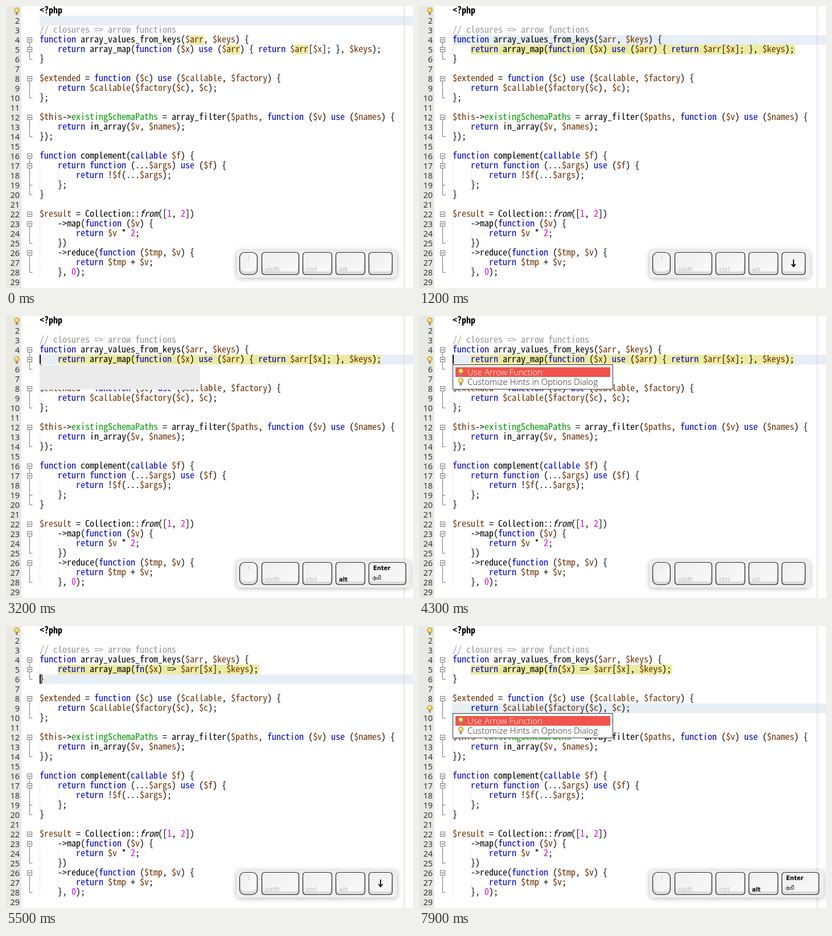
These frames come from a looping animation (715 by 495 pixels, 8 s). An HTML page:

```html
<!DOCTYPE html>
<html lang="en">
<head>
<meta charset="utf-8">
<style>
html, body { margin: 0; width: 100%; height: 100%; overflow: hidden; background: #fff; }
svg { display: block; width: 715px; height: 495px; }
text { white-space: pre; }
.code { font: 16px "Noto Sans Mono CJK JP", "Noto Sans CJK JP", monospace; }
.num { font: 14.5px "Noto Sans", sans-serif; text-anchor: end; }
.menu { font: 300 15px "Open Sans", sans-serif; }
.key { font: bold 10px "DejaVu Sans", sans-serif; }
.tag { font-weight: bold; }
.from { font-style: italic; }
.com { fill: #969696; }
.kw { fill: #0000c8; }
.var { fill: #6d3206; }
.field { fill: #009900; }
.lit { fill: #e100e1; }
</style>
</head>
<body>
<svg id="stage" viewBox="0 0 715 495"></svg>
<script>
const LOOP = 8000, ROW = 17, COL = 8, LEFT = 59;
const stage = document.getElementById('stage');
const lines = `<?php

// closures => arrow functions
function array_values_from_keys($arr, $keys) {
    return array_map(function ($x) use ($arr) { return $arr[$x]; }, $keys);
}

$extended = function ($c) use ($callable, $factory) {
    return $callable($factory($c), $c);
};

$this->existingSchemaPaths = array_filter($paths, function ($v) use ($names) {
    return in_array($v, $names);
});

function complement(callable $f) {
    return function (...$args) use ($f) {
        return !$f(...$args);
    };
}

$result = Collection::from([1, 2])
    ->map(function ($v) {
        return $v * 2;
    })
    ->reduce(function ($tmp, $v) {
        return $tmp + $v;
    }, 0);
`.split('\n');
const shortLine = '    return array_map(fn($x) => $arr[$x], $keys);';

// [time, changes]; each entry stays in force until overridden
const steps = [
  [0, { row: 2, caret: 0, marks: 1, hint: 0, bulb: 0, menu: 0, short: 0, keys: '' }],
  [200, { caret: 1 }],
  [400, { row: 3, caret: 0, keys: 'down' }],
  [500, { caret: 1, marks: 0, hint: 1 }],
  [800, { caret: 0, keys: '' }],
  [1100, { caret: 1 }],
  [1200, { row: 4, caret: 0, keys: 'down' }],
  [1300, { caret: 1 }],
  [1600, { caret: 0, keys: '' }],
  [1900, { caret: 1 }],
  [2000, { row: 5, caret: 0, keys: 'down' }],
  [2100, { caret: 1 }],
  [2400, { caret: 0, keys: '' }],
  [2600, { caret: 1, bulb: 5 }],
  [3200, { menu: 1, keys: 'alt enter' }],
  [3300, { menu: 2 }],
  [3600, { keys: 'alt' }],
  [3800, { keys: '' }],
  [4000, { caret: 0 }],
  [4300, { caret: 1 }],
  [4600, { caret: 0 }],
  [4800, { menu: 0, bulb: 0, short: 1, keys: 'enter' }],
  [4900, { caret: 1 }],
  [5200, { caret: 0 }],
  [5500, { row: 6, caret: 1, keys: 'down' }],
  [5700, { row: 7 }],
  [5800, { row: 8 }],
  [5900, { row: 9 }],
  [6100, { caret: 0 }],
  [6400, { caret: 1, keys: '' }],
  [6600, { bulb: 9 }],
  [6700, { caret: 0 }],
  [7000, { caret: 1 }],
  [7300, { caret: 0 }],
  [7500, { menu: 1, keys: 'alt enter' }],
  [7600, { menu: 2, caret: 1 }],
  [7900, { caret: 0 }]
];

const rowY = n => (n - 1) * ROW;
const esc = s => s.replace(/&/g, '&amp;').replace(/</g, '&lt;').replace(/>/g, '&gt;');
const rect = (x, y, w, h, fill, more = '') =>
  `<rect x="${x}" y="${y}" width="${w}" height="${h}" fill="${fill}" ${more}/>`;
const path = (d, stroke, more = '') => `<path d="${d}" fill="none" stroke="${stroke}" ${more}/>`;
const text = (x, y, cls, s, fill = '#000') => `<text x="${x}" y="${y}" class="${cls}" fill="${fill}">${s}</text>`;

const token = /(\/\/.*)|(<\?php)|(\$\w+)|\b(function|return|use|callable|fn)\b|(existingSchemaPaths)|\b(from)\b|\b(\d+)\b/g;
const kinds = ['com', 'tag', 'var', 'kw', 'field', 'from', 'lit'];

function codeLine(src, n) {
  const body = src.trimStart();
  let out = '', at = 0;
  for (const m of body.matchAll(token)) {
    const kind = kinds[m.slice(1).findIndex(Boolean)];
    out += esc(body.slice(at, m.index)) + `<tspan class="${kind}">${esc(m[0])}</tspan>`;
    at = m.index + m[0].length;
  }
  out += esc(body.slice(at));
  return text(LEFT + (src.length - body.length) * COL, rowY(n) + 13, 'code', out);
}

function guides() {
  let out = '';
  lines.forEach((s, i) => {
    for (let c = 0; c < s.search(/\S/); c += 4)
      out += path(`M${LEFT + c * COL + .5} ${i * ROW}v${ROW}`, '#ccc', 'stroke-dasharray="1 2"');
  });
  return out;
}

function folds() {
  let out = '';
  for (const [a, b] of [[4, 6], [8, 10], [12, 14], [16, 20], [23, 25], [26, 28]])
    out += path(`M41.5 ${rowY(a) + 13}V${rowY(b) + 8.5}h5`, '#777');
  out += path(`M41.5 ${rowY(19) + 8.5}h5`, '#777');
  for (const n of [4, 5, 8, 12, 16, 17, 22, 23, 26]) {
    const y = rowY(n) + 4.5;
    out += rect(37.5, y, 8, 8, '#fff', 'stroke="#777"') + path(`M39 ${y + 4}h5`, '#444');
  }
  return out;
}

const bulb = (x, y) => `<g transform="translate(${x} ${y})">` +
  '<circle r="4.3" cy="-1.5" fill="#f3cf55" stroke="#a98222"/><circle r="1.7" cx="-1" cy="-2.5" fill="#fff6c8"/>' +
  rect(-2, 2.5, 4, 4, '#77736b') + path('M-2 4.5h4', '#ccc') + '</g>';

function menu(s) {
  const y = rowY(s.row) + ROW;
  if (s.menu == 1) return rect(LEFT, y + 1, 282, 43, '#ebebeb');
  return rect(LEFT + .5, y + .5, 281, 43, '#fff', 'stroke="#333"') +
    rect(64, y + 5, 272, 17, '#f0544c') +
    bulb(73.5, y + 13) + text(85, y + 19, 'menu', 'Use Arrow Function', '#fff') +
    bulb(73.5, y + 30) + text(85, y + 36, 'menu', 'Customize Hints in Options Dialog', '#222');
}

function keyboard(keys) {
  const cap = (x, w, r = 5) => rect(x + .5, 432.5, w - 1, 39, 'url(#cap)', `rx="${r}" stroke="#222" stroke-width="1.2"`) +
    rect(x + 3, 434, w - 6, 32, 'url(#face)', `rx="${r - 1}"`);
  const ink = k => keys.includes(k) ? '#000' : '#d0d0d0';
  const last = keys.includes('enter') ? 66 : 42;
  let out = rect(405, 429, 240 + last, 48, '#efefef', 'rx="6" filter="url(#soft)"') +
    cap(410, 32, 9) + cap(449, 66) + cap(521, 52) + cap(579, 52) + cap(637, last) +
    path('M426.5 438v8', '#ddd', 'stroke-width="2"') +
    text(455, 466, 'key', 'shift', ink('shift')) + text(527, 466, 'key', 'ctrl', ink('ctrl')) +
    text(585, 466, 'key', 'alt', ink('alt'));
  if (keys.includes('enter'))
    out += text(645, 446, 'key', 'Enter') +
      path('M648 457l-4 3.5l4 3.5zM648 459.5h7v-4h3v6.5h-10', '#222');
  if (keys.includes('down'))
    out += path('M658 445v12M654.5 453l3.5 4.5l3.5-4.5', '#000', 'stroke-width="1.8"');
  return out;
}

const defs = `<defs>
<linearGradient id="cap" x2="0" y2="1"><stop stop-color="#fff"/><stop offset="1" stop-color="#d8d8d8"/></linearGradient>
<linearGradient id="face" x2="1" y2="1"><stop stop-color="#eee"/><stop offset="1" stop-color="#fafafa"/></linearGradient>
<filter id="soft" x="-10%" y="-40%" width="120%" height="180%"><feDropShadow dx="0" dy="1" stdDeviation="4" flood-opacity=".3"/></filter>
</defs>`;

function draw(s) {
  const line5 = s.short ? shortLine : lines[4];
  let out = defs + rect(0, 0, 715, 495, '#fff') + rect(0, 0, 27, 495, '#e9e9e3') +
    rect(LEFT, rowY(s.row), 656, ROW, '#e6eef6');
  if (s.marks)
    for (const [n, col] of [[4, 33], [5, 41], [5, 56]])
      out += rect(LEFT + col * COL, rowY(n), 3 * COL, ROW, '#eceba3');
  if (s.hint)
    out += rect(91, rowY(5), (line5.length - 4) * COL + (s.row == 5 ? 0 : 2), ROW, '#eceba3');
  out += path('M699.5 0V495', '#f3caca') + guides() + folds();
  lines.forEach((src, i) => {
    const n = i + 1;
    out += n == 1 || n == s.bulb ? bulb(19, rowY(n) + 9) : text(24, rowY(n) + 14, 'num', n, '#333');
    out += codeLine(n == 5 ? line5 : src, n);
  });
  if (s.caret) out += rect(LEFT, rowY(s.row), 2, ROW - 1, '#000');
  if (s.menu) out += menu(s);
  stage.innerHTML = out + keyboard(s.keys);
}

let shown = -1;
function tick() {
  const t = performance.now() % LOOP;
  const past = steps.filter(([at]) => at <= t);
  if (past.length != shown) {
    shown = past.length;
    draw(Object.assign({}, ...past.map(p => p[1])));
  }
  requestAnimationFrame(tick);
}
tick();
</script>
</body>
</html>
```
